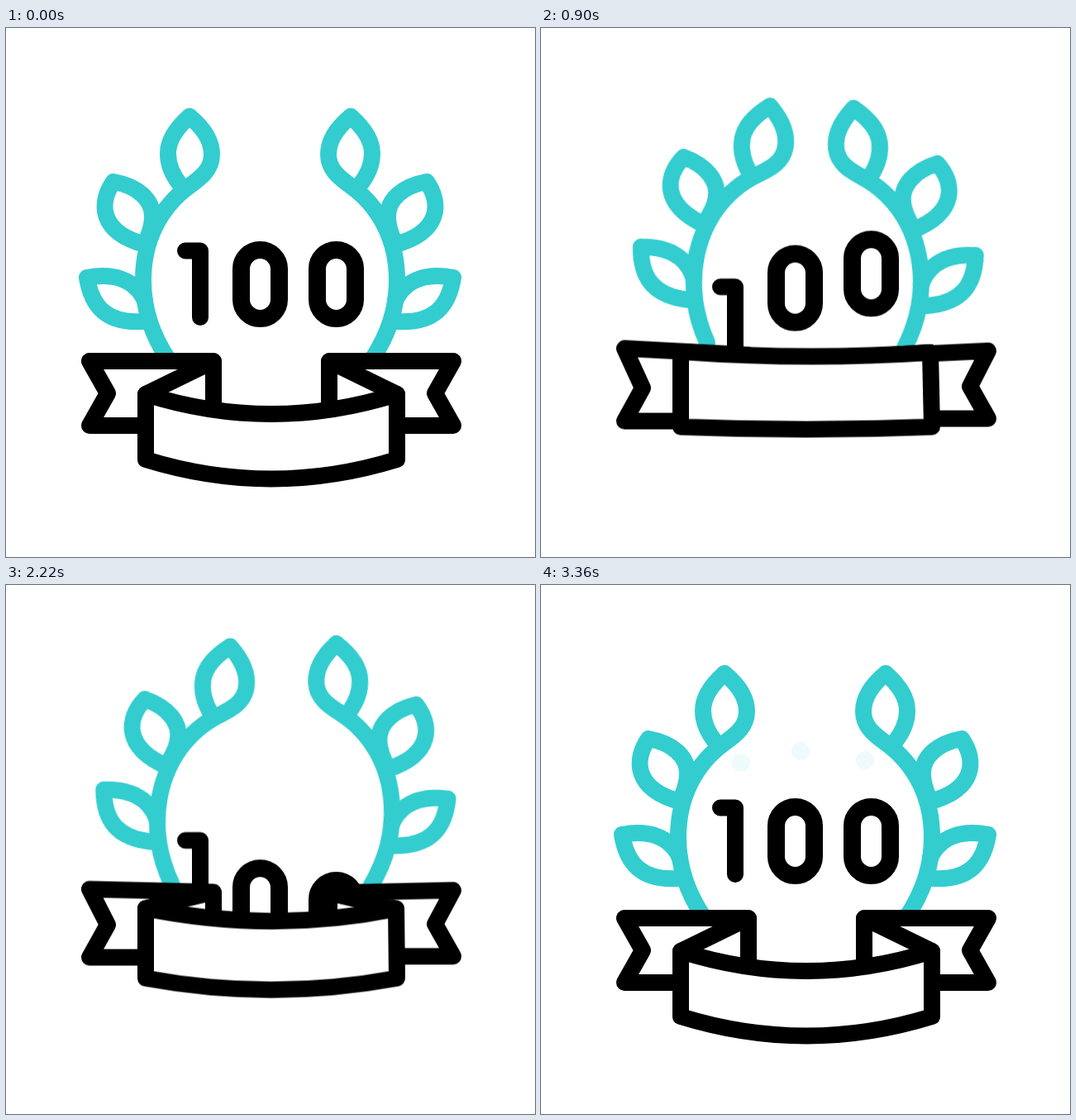
An HTML page without scripts that plays this animation: 640x640 px, repeating every 3480 ms.

```html
<!DOCTYPE html>
<html lang="en">
<head>
<meta charset="utf-8">
<title>Hundred badge</title>
<style>
html, body { margin: 0; height: 100%; overflow: hidden; background: #fff; }
svg {
  display: block; width: 100%; height: 100%;
  fill: none; stroke: #000; stroke-width: 20; stroke-linecap: round; stroke-linejoin: round;
}
rect { stroke-width: 21; }
.wreath { stroke: #33cdcf; }
.ribbon { fill: #fff; }
.dots { fill: #33cdcf; stroke: none; }

.move { animation: 3480ms cubic-bezier(.37, 0, .63, 1) infinite both; }
.badge { animation-name: jump; }
.wreath { animation-name: sink; }
.branch { transform-origin: 190px 400px; }
.left { animation-name: turn-left; }
.right { animation-name: turn-right; }
.digit { animation-name: drop; }
.second { animation-delay: 65ms; }
.third { animation-delay: 95ms; }
.tail-l { animation-name: tail-l; }
.tail-r { animation-name: tail-r; }
.front { animation-name: front; }
.dots { animation-name: dots; }

@keyframes jump {
  0%, 3.45%, 38.5%, 45.98%, 84.48%, 100% { transform: none; }
  22.7% { transform: translateY(-68px); }
  64.94% { transform: translateY(-57px); }
}
@keyframes sink {
  0%, 13.22%, 70.69%, 100% { transform: none; }
  24.14%, 55.17% { transform: translateY(40px); }
}
@keyframes turn-left {
  0%, 15.95%, 72.41%, 100% { transform: translate(0, 0) rotate(0deg); }
  34.48%, 55.17% { transform: translate(8px, -2px) rotate(18deg); }
}
@keyframes turn-right {
  0%, 5.75%, 69.54%, 100% { transform: translate(0, 0) rotate(0deg); }
  15.52% { transform: translate(0, 0) rotate(-7.5deg); }
  31.03%, 53.16% { transform: translate(3px, 7px) rotate(12deg); }
}
@keyframes drop {
  0%, 12.64%, 71.84%, 100% { transform: none; }
  16.95% { transform: translateY(-20px); }
  33.05%, 55.75% { transform: translateY(193px); }
}
/* Ribbon unfolds flat, then folds again */
@keyframes tail-l {
  0%, 10.92%, 70.69%, 100% { d: path("M169 481L101 481L123 442L101 403L251 403L251 462M169 443L251 403"); }
  22.99%, 56.32% { d: path("M169 537L101 537L123 497L101 449L251 457L251 459M169 453L251 457"); }
}
@keyframes tail-r {
  0%, 10.92%, 70.69%, 100% { d: path("M473 481L541 481L519 442L541 403L391 403L391 462M473 443L391 403"); }
  22.99%, 56.32% { d: path("M473 534L541 534L519 495L541 452L391 459L391 460M471 454L391 459"); }
}
@keyframes front {
  0%, 10.92%, 70.69%, 100% { d: path("M169 443Q321 491 473 443L473 522Q321 569 169 522Z"); }
  22.99%, 56.32% { d: path("M169 453Q321 464 471 454L473 544Q321 550 169 544Z"); }
}
@keyframes dots {
  0%, 81.03% { opacity: 0; transform: translateY(50px); }
  83.9%, 89.66% { opacity: 1; }
  93.7% { transform: none; }
  96.55%, 100% { opacity: .08; transform: none; }
}
</style>
</head>
<body>
<svg viewBox="0 0 640 640">
  <defs>
    <g id="branch">
      <path d="M222 107C206 121 196 136 196 152C196 168 203 180 211 190"/>
      <path d="M222 107C239 121 249 137 249 153C249 171 236 181 222 191C186 217 166 258 166 305C166 341 178 374 197 402"/>
      <path d="M130 186C158 191 178 207 177 229C177 243 171 254 168 262C113 247 112 212 130 186Z"/>
      <path d="M98 302C130 296 156 304 168 330M98 302C104 340 125 358 166 355"/>
    </g>
  </defs>
  <g class="move dots">
    <circle cx="242" cy="215" r="11"/>
    <circle cx="314" cy="201" r="11"/>
    <circle cx="392" cy="212" r="11"/>
  </g>
  <g class="move badge">
    <g class="move wreath">
      <g class="move branch left"><use href="#branch"/></g>
      <g transform="matrix(-1 0 0 1 639 0)">
        <g class="move branch right"><use href="#branch"/></g>
      </g>
    </g>
    <path class="move digit" d="M217 269.5H235V350"/>
    <rect class="move digit second" x="284.5" y="268.5" width="46" height="83" rx="23"/>
    <rect class="move digit third" x="376.5" y="268.5" width="46" height="83" rx="23"/>
    <g class="ribbon">
      <path class="move tail-l" d="M169 481L101 481L123 442L101 403L251 403L251 462M169 443L251 403"/>
      <path class="move tail-r" d="M473 481L541 481L519 442L541 403L391 403L391 462M473 443L391 403"/>
      <path class="move front" d="M169 443Q321 491 473 443L473 522Q321 569 169 522Z"/>
    </g>
  </g>
</svg>
</body>
</html>
```
